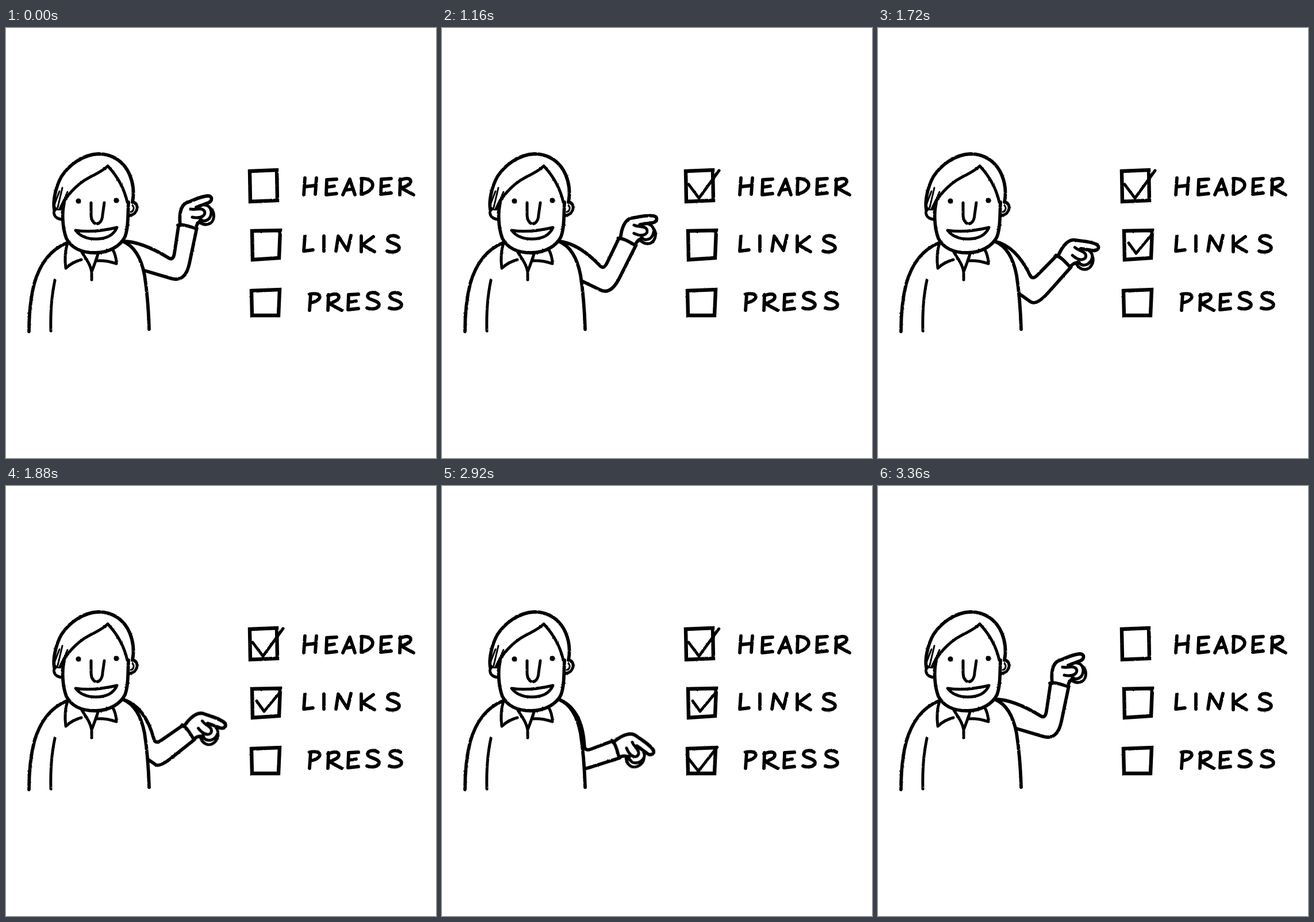
Animation, 748 px wide and 748 px high, one loop 5.28 s. Source, as an HTML page:

```html
<!DOCTYPE html>
<html lang="en">
<head>
<meta charset="utf-8">
<title>Checklist</title>
<style>
  html, body { margin: 0; width: 100%; height: 100%; overflow: hidden; background: #fff; }
  svg { display: block; width: 100%; height: 100%; }
  .ink { fill: none; stroke: #000; stroke-width: 5.8; stroke-linecap: round; stroke-linejoin: round; }
  .mid { stroke-width: 5; }
  .thin { stroke-width: 3; }
  .boxes { stroke-width: 6.4; stroke-linejoin: miter; }
</style>
</head>
<body>
<svg viewBox="0 0 748 748" role="img" aria-label="A man points at a checklist: header, links, press">
  <defs>
    <filter id="rough" filterUnits="userSpaceOnUse" x="0" y="0" width="748" height="748" color-interpolation-filters="sRGB">
      <feTurbulence type="fractalNoise" baseFrequency=".22" numOctaves="2" seed="4"/>
      <feDisplacementMap in="SourceGraphic" scale="2" xChannelSelector="R" yChannelSelector="G"/>
    </filter>
    <path id="E" d="M2 1L1 27M2 1L19 0M2 14L15 12M1 27L19 25"/>
    <path id="R" d="M2 1L1 28M1 3C11-2 20-1 20 5C20 11 11 14 3 16C10 20 18 25 25 28"/>
    <path id="S" d="M9-12C4-16-8-16-9-9C-9-1 10-2 11 6C11 14-3 15-10 12"/>
  </defs>

  <g class="ink" filter="url(#rough)">
    <g id="head">
      <path d="M84 316C81 300 87 276 96 259C109 239 133 220 161 219C187 219 206 234 215 255C221 269 223 287 220 303"/>
      <path class="mid" d="M94 315C102 295 122 272 145 260C158 253 168 249 177 240C192 256 205 276 211 303"/>
      <path d="M101 304C97 322 98 347 105 366C114 383 132 391 155 391C178 391 199 380 207 363C213 347 212 324 213 303"/>
      <path class="mid" d="M87 315C80 319 83 332 98 333M222 303C232 306 230 325 214 326"/>
      <path class="thin" d="M220 309C224 312 222 319 217 320M85 305L93 284M90 312L98 278M96 309L107 285M83 311L91 316"/>
      <path class="mid" d="M148 304L148 324C148 346 167 346 168 325L171 304"/>
      <path class="mid" d="M121 352C146 356 172 352 193 347C187 361 175 367 156 367C140 367 128 361 121 352Z"/>
      <g fill="#000" stroke="none">
        <circle cx="126" cy="301" r="4.6"/>
        <circle cx="192" cy="300" r="4.6"/>
      </g>
    </g>

    <g id="body">
      <path d="M108 373C74 386 58 414 49 445C42 473 40 499 40 528"/>
      <path class="mid" d="M85 439C80 462 77 488 78 527"/>
      <path d="M203 371C225 380 236 404 241 430C246 462 248 492 249 524"/>
      <path class="mid" d="M107 374C102 390 102 403 104 418C111 411 120 406 131 403M132 390C139 402 147 411 149 424L149 438M160 393C156 406 152 416 149 424M156 405C168 404 181 406 192 410C192 400 189 391 185 384"/>
    </g>

    <path id="arm"/>
    <g id="hand">
      <path d="M299 343C307 341 319 345 331 349"/>
      <path d="M303 343C301 326 303 309 314 304C326 300 337 293 351 292C360 292 359 301 352 304C344 307 338 309 331 312"/>
      <path class="mid" d="M321 315C331 317 339 312 344 317C350 324 341 333 324 329M346 308C357 309 359 321 355 329C351 336 343 337 338 334M356 314C364 321 363 335 355 340C349 343 343 342 338 339"/>
      <path d="M331 346C332 341 335 337 340 334"/>
    </g>

    <g class="boxes">
      <path d="M424 249L471 247L472 300L425 302Z"/>
      <path d="M428 353L477 352L475 400L429 403Z"/>
      <path d="M427 457L476 455L474 500L428 500Z"/>
    </g>
    <g id="checks" class="mid">
      <path pathLength="1" d="M429 272L447 296L482 248"/>
      <path pathLength="1" d="M436 374L449 392L478 357"/>
      <path pathLength="1" d="M428 473L446 496L479 454"/>
    </g>

    <g id="letters">
      <g aria-label="HEADER">
        <path d="M520 261L518 290M540 261L538 289M520 276L538 274"/>
        <use href="#E" x="556" y="263"/>
        <path d="M586 290L598 263L607 290M591 282L604 280"/>
        <path d="M619 262L618 289M618 262C644 261 645 283 618 289"/>
        <use href="#E" x="651" y="262"/>
        <use href="#R" x="684" y="262"/>
      </g>
      <g aria-label="LINKS">
        <path d="M520 362L518 388L534 386M553 362L553 388"/>
        <path d="M574 388L578 362L594 387L600 361"/>
        <path d="M618 362L618 389M639 363L620 377L641 389"/>
        <use href="#S" x="673" y="376"/>
      </g>
      <g aria-label="PRESS">
        <path d="M530 463L528 491M528 463C551 458 552 474 530 478"/>
        <use href="#R" x="559" y="463"/>
        <use href="#E" x="594" y="463"/>
        <use href="#S" x="638" y="475"/>
        <use href="#S" x="677" y="475"/>
      </g>
    </g>
  </g>
</svg>
<script>
const LOOP = 5280, STEP = 40;
const MOVE = 440, MARK = 320;      // durations of an arm move and a tick
const LOWER = 960, BEAT = 720;     // first arm move, and time from one move to the next
const REWIND = 2900, REWOUND = 3360;
const TURN = 57;                   // degrees the hand turns from raised to lowered

const progress = (t, from, to) => Math.max(0, Math.min(1, (t - from) / (to - from)));
const smooth = x => x * x * (3 - 2 * x);
const easeOut = x => 1 - (1 - x) ** 3;
const mix = (a, b, k) => a.map((v, i) => v + (b[i] - v) * k);

// Parabola through a, b and c at s = 0, 1/2 and 1.
const through = (a, b, c) => s =>
  a.map((v, i) => v * (1 - s) * (1 - 2 * s) + 4 * b[i] * s * (1 - s) + c[i] * s * (2 * s - 1));

const shoulder = [203, 371];
const cuffAt = through([316, 346], [323, 405], [302, 459]);
const bendAt = through([236, 371], [240, 379], [244, 388]);
const innerElbowAt = through([291, 405], [269, 438], [248, 462]);
const armpitAt = through([241, 422], [245, 461], [249, 492]);
const outerElbowAt = through([312, 443], [276, 483], [262, 488]);
const cuffStart = cuffAt(0);

// Forearm edge with a rounded elbow.
const elbowTo = (elbow, cuff, before, k) => `${before}Q${elbow} ${mix(elbow, cuff, k)}L${cuff}`;

const arm = document.getElementById("arm");
const hand = document.getElementById("hand");
const checks = [...document.querySelectorAll("#checks path")];

// s runs from 0, arm raised, to 1, arm lowered.
function drawArm(s) {
  const cuff = cuffAt(s), bend = bendAt(s), inner = innerElbowAt(s);
  const armpit = armpitAt(s), outer = outerElbowAt(s);
  const angle = (8 + TURN * s) * Math.PI / 180;
  const edge = [16 * Math.cos(angle), 16 * Math.sin(angle)];
  const top = cuff.map((v, i) => v - edge[i]);
  const bottom = cuff.map((v, i) => v + edge[i]);

  const upper = `M${shoulder}Q${bend} ${mix(inner, bend, .14)}`;
  const lower = `M${armpit}L${mix(outer, armpit, .35)}`;
  arm.setAttribute("d", elbowTo(inner, top, upper, .22) + elbowTo(outer, bottom, lower, .35));
  hand.setAttribute("transform",
    `translate(${cuff}) rotate(${TURN * s}) translate(${cuffStart.map(v => -v)})`);
}

function draw(t) {
  const kept = 1 - smooth(progress(t, REWIND, REWOUND));
  const move = start => smooth(progress(t, start, start + MOVE)) / 2;
  drawArm((move(LOWER) + move(LOWER + BEAT)) * kept);

  checks.forEach((check, i) => {
    const end = LOWER + i * BEAT;
    const start = i ? end - MARK : 500;
    const p = easeOut(progress(t, start, end)) * kept;
    check.style.visibility = p > 0 ? "visible" : "hidden";
    check.setAttribute("stroke-dasharray", p < 1 ? `${p} 2` : "none");
  });
}

const start = performance.now();
function tick() {
  const t = (performance.now() - start) % LOOP;
  draw(Math.floor(t / STEP) * STEP);
  requestAnimationFrame(tick);
}
tick();
</script>
</body>
</html>
```
